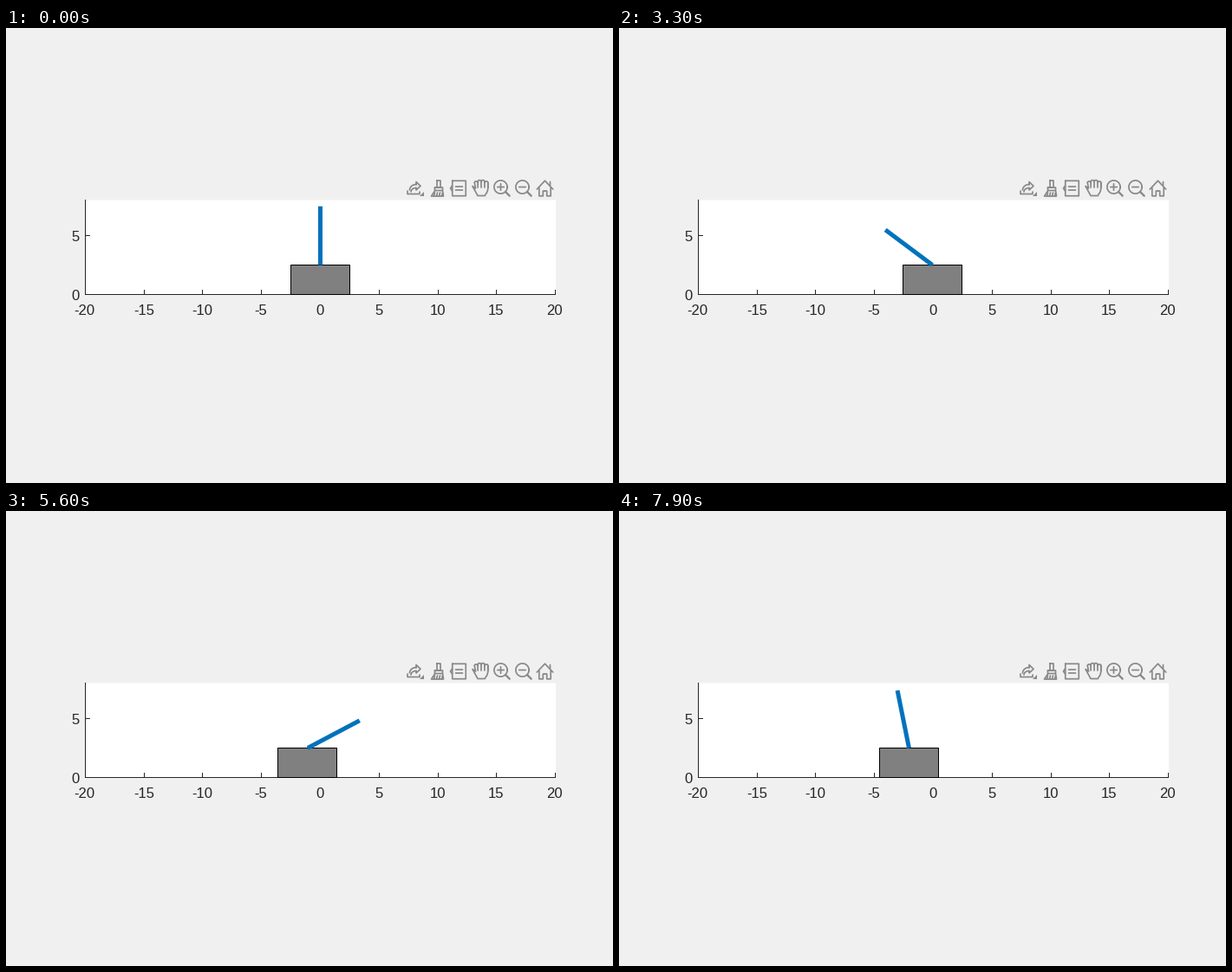
A matplotlib script that plays this animation: 700x525 px, repeating every 8 s.

```python
import numpy as np
import matplotlib.pyplot as plt
from matplotlib.animation import FuncAnimation
from matplotlib.patches import Polygon, Rectangle

W, H, DPI = 700, 525, 100
PX = 72 / DPI                       # one pixel in points
FRAMES, STEP, START = 80, 100, 4    # START: last frame of the rest pose
X0, Y0, UNIT = 362.5, 307.4, 13.56  # plot origin and pixels per unit
POLE, HALF, TOP = 5, 2.5, 2.5
INK, ICON, BLUE = "#262626", "#888888", "#0072bd"

fig = plt.figure(figsize=(W / DPI, H / DPI), dpi=DPI, facecolor="#f0f0f0")
ax = fig.add_axes([0, 0, 1, 1])
ax.set_xlim(0, W)
ax.set_ylim(H, 0)
ax.axis("off")


def to_px(x, y):
    return X0 + UNIT * x, Y0 - UNIT * y


def line(xs, ys, color=INK, width=1, z=2, cap="butt"):
    return ax.plot(xs, ys, color=color, lw=width * PX, zorder=z, snap=False,
                   solid_capstyle=cap, solid_joinstyle="round")[0]


def label(x, y, s, ha):
    ax.text(x, y, s, ha=ha, va="baseline", color=INK, fontsize=12,
            family="Liberation Sans")


def draw_axes():
    left, right, base = 91.5, 633.5, 307.5
    ax.add_patch(Rectangle((91, 308), 543, -109.5, fc="white", ec="none", snap=False))
    line([left, left], [base, 198.5], cap="projecting")
    line([left, right], [base, base], cap="projecting")
    for v in range(-20, 21, 5):
        x = min(max(np.floor(to_px(v, 0)[0]) + 0.5, left), right)
        line([x, x], [base, base - 5.5])
        label(x - 0.7, 331, str(v), "center")
    for v in (0, 5):
        y = np.floor(to_px(0, v)[1]) + 0.5
        line([left, left + 5.5], [y, y])
        label(84.2, y + 6.3, str(v), "right")


class Icon:
    """Pen for a toolbar icon, in pixels around its centre."""

    def __init__(self, x, y=185):
        self.pos = np.array([x, y])

    def path(self, *points, width=1.7):
        xs, ys = (np.array(points) + self.pos).T
        line(xs, ys, ICON, width, 3, "round")

    def box(self, w, top, bottom, x=0):
        l, r = x - w / 2, x + w / 2
        self.path((l, top), (r, top), (r, bottom), (l, bottom), (l, top))

    def arc(self, x, y, rx, ry, a0=0, a1=360):
        a = np.radians(np.linspace(a0, a1, 40))
        self.path(*zip(x + rx * np.cos(a), y - ry * np.sin(a)))

    def fill(self, *points):
        ax.add_patch(Polygon(np.array(points) + self.pos, fc=ICON, zorder=3))


def share(p):
    p.path((-8.5, 3), (-8.5, 6.5), (5.5, 6.5), (5.5, 4))
    p.arc(1.5, 2, 7.5, 6.5, 180, 90)
    p.arc(1.5, 4, 6, 4.5, 180, 90)
    p.path((1.5, -4), (1.5, -7.5), (6.5, -2.7), (1.5, 2), (1.5, -0.5))
    p.fill((10, 4), (10, 8.5), (5.5, 8.5))


def brush(p):
    p.box(4, -9, -1, 2.5)
    p.box(9, -1, 2.5, 2.5)
    p.path((-2, 3), (-6, 9), (8, 9), (7, 3))
    for x in range(-3, 7, 3):
        p.path((x, 9), (x + 1, 5))


def note(p):
    p.box(15.5, -8.7, 8.7, 1)
    p.path((-7, -3), (-9, 0), (-7, 3))
    for y in (-2, 2):
        p.path((-3, y), (5, y))


def hand(p):
    for i in range(4):
        x, y = 3.9 * i - 4.3, -6.5 - 1.5 * np.sin(i * np.pi / 3)
        p.arc(x, y, 1.9, 1.6, 0, 180)
        p.path((x + 1.9, y), (x + 1.9, -1))
    p.path((-6.2, -6.5), (-5, 0), (-8.5, -2.5), (-2.5, 8.5), (6, 8.5))
    p.arc(3, -1, 6.3, 9.5, 0, -60)
    p.path((9.3, -6.5), (9.3, -1))


def zoom(p, plus=False):
    p.arc(-1, -1.5, 7.6, 7.6)
    p.path((4.5, 4), (9.2, 8.7), width=2.3)
    p.path((-4.8, -1.5), (2.8, -1.5))
    if plus:
        p.path((-1, -5.3), (-1, 2.3))


def zoom_in(p):
    zoom(p, True)


def home(p):
    p.path((-9.2, 1), (0, -8.8), (9.2, 1))
    for s in (-1, 1):
        p.path((6.7 * s, -0.5), (6.7 * s, 8.8), (2.2 * s, 8.8), (2.2 * s, 3), (0, 3))
    p.path((6, -7.5), (6, -3.5))


def swing():
    """Pole angle from upright in each frame, with energy to pass over the top."""
    sub = 200
    h = STEP / 1000 / sub

    def speed(a):
        w = 0.397 if a < np.pi else 0.5
        return np.sqrt(w * w + 4 * 2.9 * np.sin(a / 2) ** 2)

    angles, a = [0.0] * (START + 1), 0.0
    while len(angles) < FRAMES:
        for _ in range(sub):
            a += h * speed(a + h / 2 * speed(a))
        angles.append(a)
    return angles


def cart_x(t, angle):
    drift = 0.0455 * max(t - 1.1, 0) ** 2
    return -drift - 0.18 * np.sin(angle)


draw_axes()
for i, draw in enumerate((share, brush, note, hand, zoom_in, zoom, home)):
    draw(Icon(471.5 + 25 * i))

cart = Rectangle((0, 307.5), 68, -34, fc="#808080", ec="black", lw=PX,
                 zorder=4, snap=False)
ax.add_patch(cart)
pole = line([0, 0], [0, 0], BLUE, 5, 5)
pole.set_clip_path(Rectangle((91, 308.5), 543, -110, transform=ax.transData))
ANGLES = swing()


def update(n):
    a = ANGLES[n]
    x = cart_x(n * STEP / 1000, a)
    cart.set_x(np.floor(to_px(x - HALF, 0)[0]) + 0.5)
    bx, by = to_px(x, TOP)
    tx, ty = to_px(x + POLE * np.sin(a), TOP + POLE * np.cos(a))
    pole.set_data([bx, tx], [by, ty])
    return cart, pole


anim = FuncAnimation(fig, update, frames=FRAMES, interval=STEP,
                     init_func=lambda: update(0), repeat=True, repeat_delay=0)
plt.show()
```
